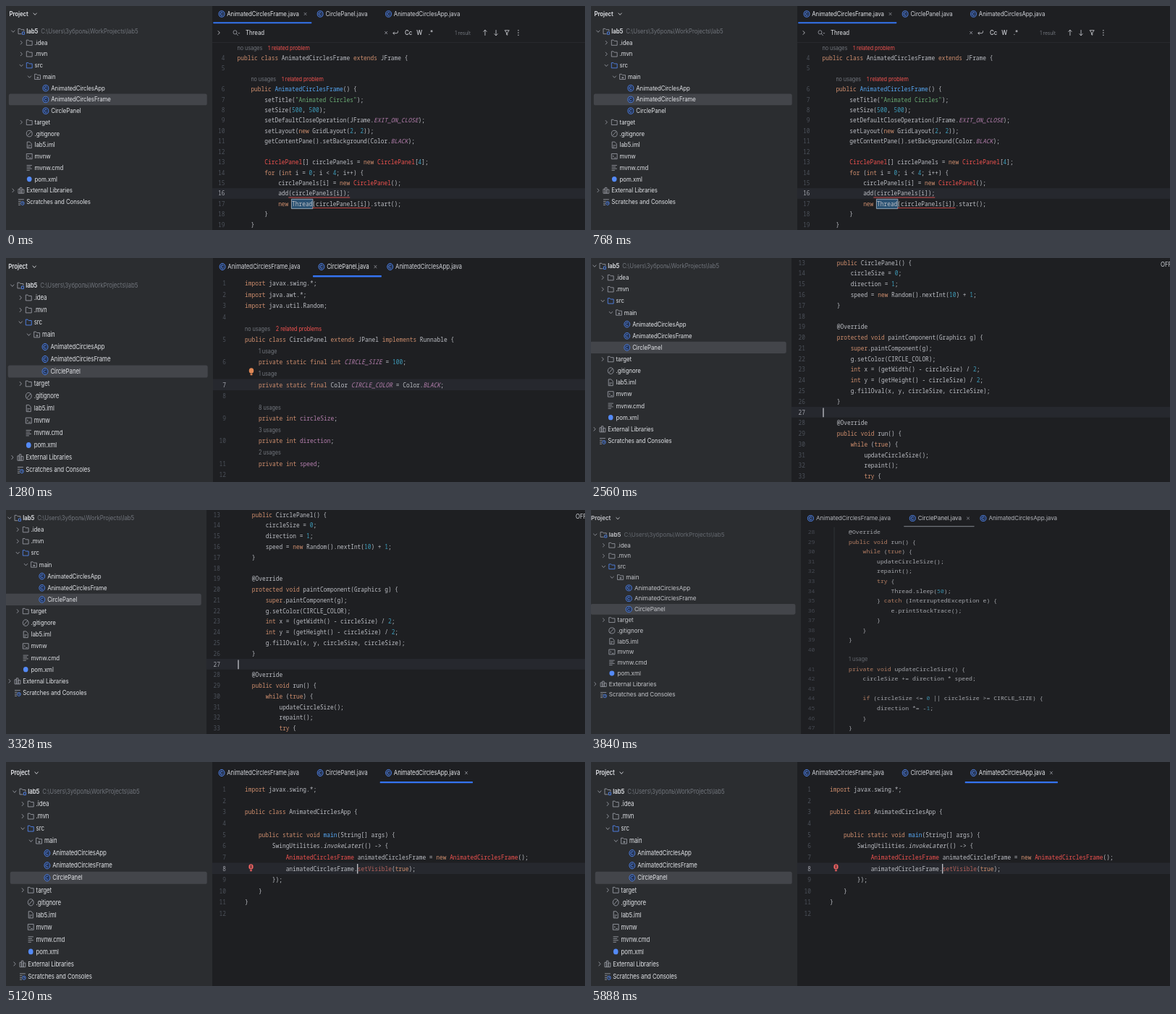
Animation of 800x310 px, one loop 6.4 s. Source, as an HTML page with a canvas:

```html
<!DOCTYPE html>
<html lang="en">
<head>
<meta charset="utf-8">
<title>Code editor tour</title>
<style>
html, body { margin: 0; width: 100%; height: 100%; overflow: hidden; background: #1e1f22; }
canvas { display: block; }
</style>
</head>
<body>
<canvas id="stage" width="800" height="310"></canvas>
<script>
const ctx = document.getElementById('stage').getContext('2d');
const SCENE_MS = 1280, CHAR = 7.8, LINE = 22, ROW = 24;
const UI = 'Inter, sans-serif', MONO = '"Noto Sans Mono", monospace';
const C = {
  panel: '#2b2d30', editor: '#1e1f22', row: '#43454a', line: '#26282e', guide: '#313438',
  text: '#dfe1e5', code: '#bcbec4', dim: '#6f737a', num: '#4b5059', icon: '#9da0a8',
  soft: '#ced0d6', blue: '#548af7', accent: '#3574f0', keyword: '#cf8e6d', digit: '#3d9ab8',
  string: '#6aab73', method: '#56a8f5', field: '#b57fae', error: '#f0524f', alert: '#db5c5c'
};
const KEYWORDS = new Set(('import public private protected class extends implements static ' +
  'final int void new if for while try catch super true').split(' '));

// [depth, icon, label, chevron]
const TREE = [
  [0, 'module', 'lab5', 'v'], [1, 'folder', '.idea', '>'], [1, 'folder', '.mvn', '>'],
  [1, 'source', 'src', 'v'], [2, 'package', 'main', 'v'],
  [3, 'class', 'AnimatedCirclesApp'], [3, 'class', 'AnimatedCirclesFrame'], [3, 'class', 'CirclePanel'],
  [1, 'folder', 'target', '>'], [1, 'ignore', '.gitignore'], [1, 'file', 'lab5.iml'],
  [1, 'shell', 'mvnw'], [1, 'lines', 'mvnw.cmd'], [1, 'dot', 'pom.xml'],
  [0, 'books', 'External Libraries', '>'], [0, 'scratch', 'Scratches and Consoles']
];
const TABS = ['AnimatedCirclesFrame.java', 'CirclePanel.java', 'AnimatedCirclesApp.java'];
const TAB_X = [2, 227, 383, 595];

// Lines starting with # are inlay hints: "usage|problem".
const SCENES = [
  { sx: .605, sy: .6556, tree: [28, 35], edge: 285, num: 302.5, code: 319.5, top: 57.5,
    first: 4, sel: 6, tab: 0, cur: 16, find: true, words: { CirclePanel: C.error },
    under: [[15, 15, 18], [16, 22, 17]], match: [16, 16, 6],
    lines: `#no usages|1 related problem
public class AnimatedCirclesFrame extends JFrame {

    #no usages|1 related problem
    public AnimatedCirclesFrame() {
        setTitle("Animated Circles");
        setSize(500, 500);
        setDefaultCloseOperation(JFrame.EXIT_ON_CLOSE);
        setLayout(new GridLayout(2, 2));
        getContentPane().setBackground(Color.BLACK);

        CirclePanel[] circlePanels = new CirclePanel[4];
        for (int i = 0; i < 4; i++) {
            circlePanels[i] = new CirclePanel();
            add(circlePanels[i]);
            new Thread(circlePanels[i]).start();
        }
    }` },
  { sx: .608, sy: .7083, tree: [27, 38], edge: 286, num: 304, code: 330, top: 35,
    first: 1, sel: 7, tab: 1, cur: 7, bulb: [339, 157, '#e08855'],
    words: { circleSize: C.field, direction: C.field, speed: C.field },
    lines: `import javax.swing.*;
import java.awt.*;
import java.util.Random;

#no usages|2 related problems
public class CirclePanel extends JPanel implements Runnable {
    #1 usage
    private static final int CIRCLE_SIZE = 100;
    #1 usage
    private static final Color CIRCLE_COLOR = Color.BLACK;

    #8 usages
    private int circleSize;
    #3 usages
    private int direction;
    #2 usages
    private int speed;
` },
  { sx: .603, sy: .672, tree: [23, 11], edge: 277, num: 296, code: 321, top: 6.5,
    first: 13, sel: 7, tab: 1, cur: 27, plain: true, caret: [14, 0], off: true,
    lines: `    public CirclePanel() {
        circleSize = 0;
        direction = 1;
        speed = new Random().nextInt(10) + 1;
    }

    @Override
    protected void paintComponent(Graphics g) {
        super.paintComponent(g);
        g.setColor(CIRCLE_COLOR);
        int x = (getWidth() - circleSize) / 2;
        int y = (getHeight() - circleSize) / 2;
        g.fillOval(x, y, circleSize, circleSize);
    }

    @Override
    public void run() {
        while (true) {
            updateCircleSize();
            repaint();
            try {` },
  { sx: .626, sy: .6154, tree: [24.5, 34], edge: 290, num: 309.5, code: 336.5, top: 30.5,
    first: 28, sel: 7, tab: 1, plain: true, unfocused: true,
    lines: `    @Override
    public void run() {
        while (true) {
            updateCircleSize();
            repaint();
            try {
                Thread.sleep(50);
            } catch (InterruptedException e) {
                e.printStackTrace();
            }
        }
    }

    #1 usage
    private void updateCircleSize() {
        circleSize += direction * speed;

        if (circleSize <= 0 || circleSize >= CIRCLE_SIZE) {
            direction *= -1;
        }
    }` },
  { sx: .605, sy: .7097, tree: [30, 41], edge: 285, num: 304, code: 330, top: 38,
    first: 1, sel: 7, tab: 2, cur: 8, bulb: [338.5, 146, C.alert], caret: [7, 33],
    words: { AnimatedCirclesFrame: C.error, setVisible: '#b5625c', invokeLater: 'italic' },
    lines: `import javax.swing.*;

public class AnimatedCirclesApp {

    public static void main(String[] args) {
        SwingUtilities.invokeLater(() -> {
            AnimatedCirclesFrame animatedCirclesFrame = new AnimatedCirclesFrame();
            animatedCirclesFrame.setVisible(true);
        });
    }
}
` }
];

let textAlpha = 1;

function rect(color, x, y, w, h, r = 0) {
  ctx.fillStyle = color;
  ctx.beginPath();
  ctx.roundRect(x, y, w, h, r);
  ctx.fill();
}

function circle(color, x, y, r) {
  rect(color, x - r, y - r, 2 * r, 2 * r, r);
}

function stroke(color, x, y, path, width = 1.3) {
  ctx.save();
  ctx.translate(x, y);
  ctx.strokeStyle = color;
  ctx.lineWidth = width;
  ctx.stroke(new Path2D(path));
  ctx.restore();
}

// Draws text centred on y and returns its width.
function text(str, x, y, color = C.text, font = '13px ' + UI, align = 'left') {
  ctx.font = font;
  ctx.letterSpacing = font.endsWith(UI) ? '-0.12px' : '0px';
  ctx.fillStyle = color;
  ctx.textAlign = align;
  ctx.globalAlpha = textAlpha;
  ctx.fillText(str, x, y + 4.6);
  ctx.globalAlpha = 1;
  return ctx.measureText(str).width;
}

function origin(s, x, y) {
  ctx.setTransform(s.sx, 0, 0, s.sy, x, y);
}

function chevron(kind, x, y, color = C.icon) {
  stroke(color, x, y, kind === 'v' ? 'M-4-2l4 4l4-4' : 'M-2-4l4 4l-4 4');
}

function icon(kind, x, y) {
  const draw = (path, color = C.icon) => stroke(color, x, y, path);
  const folder = 'M-6.5-5.5h4.5l2 2h6.5v9h-13z';
  switch (kind) {
    case 'class':
      circle('#25324d', x, y, 6.5);
      draw('M6.5 0a6.5 6.5 0 1 1-13 0a6.5 6.5 0 1 1 13 0M2.4-2a3.1 3.1 0 1 0 0 4', C.blue);
      break;
    case 'folder': draw(folder); break;
    case 'source': draw(folder, C.blue); break;
    case 'package': draw(folder + 'M-1 1h3v2h-3z'); break;
    case 'module':
      draw(folder);
      rect(C.panel, x + 1, y, 8, 8);
      draw('M2.5 1.5h5v5h-5z', C.blue);
      break;
    case 'ignore': draw('M6.5 0a6.5 6.5 0 1 1-13 0a6.5 6.5 0 1 1 13 0M4.5-4.5l-9 9'); break;
    case 'file': draw('M-5-6.5h6l4 4v9h-10zM-3 1h6M-3 4h3'); break;
    case 'shell': draw('M-6.5-5.5h13v11h-13zM-4-2l2.5 2l-2.5 2M0 3h4'); break;
    case 'lines': draw('M-6-5h12M-6-1.5h9M-6 2h12M-6 5.5h7'); break;
    case 'dot': circle(C.blue, x, y, 5.5); break;
    case 'books': draw('M-6.5-3h4v9h-4zM-2.5-6h4v12h-4zM1.5-2h5v8h-5z'); break;
    case 'scratch':
      draw('M-6.5-5h13M-6.5-1h6M-6.5 3h5M-6.5 6.5h5');
      draw('M7 3a3.7 3.7 0 1 1-7.4 0a3.7 3.7 0 1 1 7.4 0M3.3 1v2h2', C.blue);
  }
}

function drawTree(s) {
  origin(s, ...s.tree);
  rect(C.row, -40, s.sel * ROW - 12, (s.edge - s.tree[0]) / s.sx + 28, ROW, 4);
  text('Project', -39, -36.6, C.text, '600 13px ' + UI);
  chevron('v', 20, -36.6, C.text);
  TREE.forEach(([depth, kind, label, arrow], i) => {
    const x = depth * 18.7, y = i * ROW;
    if (arrow) chevron(arrow, x - 30, y);
    icon(kind, x - 11.7, y);
    const w = text(label, x + .5, y, C.text, (i ? '' : '600 ') + '13px ' + UI);
    if (!i) text('C:\\Users\\Зуброль\\WorkProjects\\lab5', w + 7, y, C.dim);
  });
}

function drawTabs(s) {
  origin(s, s.edge, s.tree[1] - 36.6 * s.sy);
  TABS.forEach((name, i) => {
    const x = TAB_X[i], active = i === s.tab;
    icon('class', x + 19.5, 0);
    const w = text(name, x + 31.5, 0, active ? C.text : C.soft);
    if (!active) return;
    stroke(C.icon, x + w + 46, 0, 'M-3-3l6 6M3-3l-6 6', 1.1);
    rect(s.unfocused ? C.dim : C.accent, x, 17, TAB_X[i + 1] - x, s.unfocused ? 2 : 3.2, 1);
  });
}

function drawFind(s) {
  origin(s, s.edge, 37);
  rect(C.panel, 0, 20, 860, 1);
  chevron('>', 15, 0, C.soft);
  stroke(C.icon, 53, 0, 'M3-1a4 4 0 1 1-8 0a4 4 0 1 1 8 0M2 2l4 4M6 1h4');
  text('Thread', 76, 0);
  stroke(C.icon, 397, 0, 'M-3-3l6 6M3-3l-6 6');
  stroke(C.soft, 418, 0, 'M6-4v2q0 3-3 3h-8M-2-2l-3 3l3 3');
  [['Cc', 448], ['W', 473], ['.*', 499]].forEach(([t, x]) =>
    text(t, x, 0, C.soft, '500 13px ' + UI, 'center'));
  text('1 result', 554, 0, C.dim, '11px ' + UI);
  stroke(C.soft, 623, 0, 'M0 6v-12M-4-2l4-4l4 4');
  stroke(C.soft, 648, 0, 'M0-6v12M-4 2l4 4l4-4');
  stroke(C.soft, 673, 0, 'M-5-5h10l-4 5v5l-2-1v-4z');
  for (const y of [-5, 0, 5]) circle(C.soft, 699, y, 1.2);
}

const isConstant = token => /^[A-Z_]{4,}$/.test(token);

function tokenColor(s, token, line, end) {
  if (KEYWORDS.has(token)) return C.keyword;
  if (/^\d/.test(token)) return C.digit;
  if (token[0] === '"') return C.string;
  if (s.plain) return C.code;
  if (isConstant(token)) return C.field;
  if (line[end] === '(' && /^ *(public|private|protected)/.test(line)) return C.method;
  const own = s.words[token];
  return own && own !== 'italic' ? own : C.code;
}

function drawLine(s, line, y) {
  for (const m of line.matchAll(/"[^"]*"|\w+|[^\w\s]/g)) {
    const token = m[0];
    const slanted = !s.plain && (isConstant(token) || s.words[token] === 'italic');
    const color = tokenColor(s, token, line, m.index + token.length);
    text(token, m.index * CHAR, y, color, (slanted ? 'italic ' : '') + '13px ' + MONO);
  }
}

function drawCode(s) {
  const gutter = (s.num - s.code) / s.sx;
  const left = (s.edge - s.code) / s.sx;
  let n = s.first;
  origin(s, s.code, s.top);
  if (s.unfocused) rect(C.guide, -1.5, -11, 1.5, 500);
  s.lines.split('\n').forEach((line, i) => {
    const y = i * LINE, hint = line.match(/^( *)#(.*)/);
    if (hint) {
      const [usage, problem] = hint[2].split('|'), x = hint[1].length * CHAR;
      const w = text(usage, x, y, C.dim, '12px ' + UI);
      if (problem) text(problem, x + w + 13, y, C.error, '12px ' + UI);
      return;
    }
    const current = n === s.cur;
    if (current) rect(C.line, left, y - 11, 900, LINE);
    text(n++, gutter, y, current ? '#a1a3ab' : C.num, '13px ' + MONO, 'right');
    if (s.match && s.match[0] - 1 === i) {
      const [, col, len] = s.match;
      rect('#2b5273', col * CHAR - 1, y - 10, len * CHAR + 2, 20);
      stroke('#a9b7c6', col * CHAR - 1, y - 10, `M0 0h${len * CHAR + 2}v20h${-len * CHAR - 2}z`);
    }
    drawLine(s, line, y);
  });
  for (const [row, col, len] of s.under || [])
    stroke(C.error, col * CHAR, (row - 1) * LINE + 8.5, `M0 0h${len * CHAR}`);
  if (s.caret) rect(C.soft, s.caret[1] * CHAR - 1, s.caret[0] * LINE - 9, 2, 19);
}

function drawBulb(s) {
  const [x, y, color] = s.bulb;
  origin(s, x, y);
  circle(color, 0, -1.5, 5.3);
  rect(color, -2.5, 4.5, 5, 3, 1);
  if (color === C.alert) rect(C.editor, -.8, -4.5, 1.6, 6);
}

function drawScene(s) {
  ctx.resetTransform();
  textAlpha = s.unfocused ? .85 : 1;
  rect(C.editor, 0, 0, 800, 310);
  rect(C.panel, 0, 0, s.edge, 310);
  drawTree(s);
  drawCode(s);
  drawTabs(s);
  if (s.find) drawFind(s);
  if (s.bulb) drawBulb(s);
  if (s.off) {
    origin(s, 787, 9);
    text('OFF', 0, 0, C.soft);
  }
}

function tick() {
  drawScene(SCENES[Math.floor(performance.now() / SCENE_MS) % SCENES.length]);
  requestAnimationFrame(tick);
}
tick();
</script>
</body>
</html>
```
